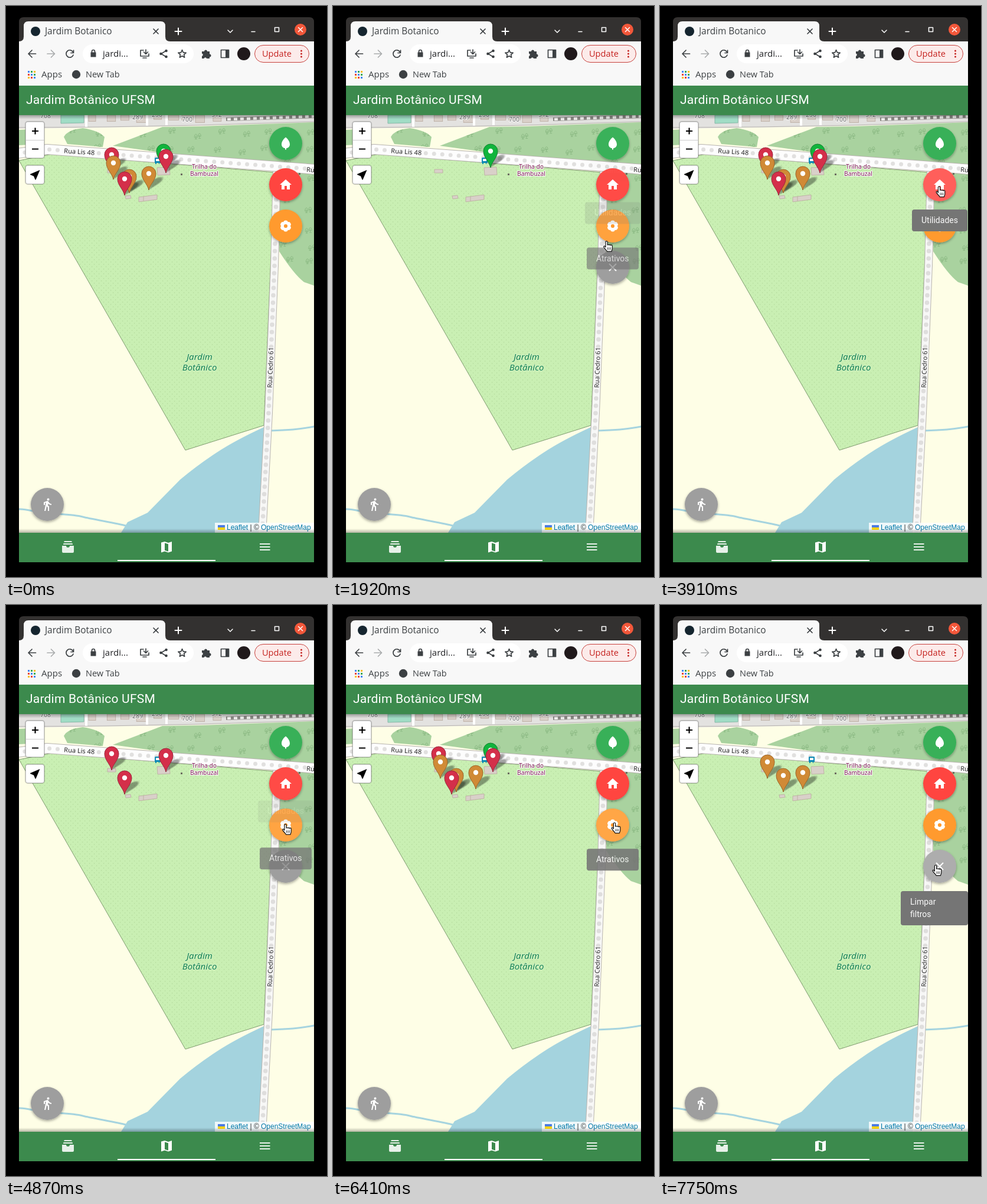
Recreate the animation shown at these times as an HTML page. Size 544 by 968 pixels, loop 7.99 s.

```html
<!DOCTYPE html>
<html lang="pt">
<head>
<meta charset="utf-8">
<title>Jardim Botânico UFSM</title>
<style>
html,body{margin:0;width:100%;height:100%;overflow:hidden;background:#000}
svg{display:block;width:100vw;height:100vh}
.ui{font:15px "Open Sans",sans-serif;fill:#3c4043}
.app{font-family:Roboto,sans-serif}
.map{font-family:"Noto Sans",sans-serif;paint-order:stroke;stroke:#fff;stroke-width:2px;stroke-linejoin:round}
.mid{text-anchor:middle}
.tip{font:14px Roboto,sans-serif;fill:#fafafa}
.attr{font:12px "Liberation Sans",Arial,sans-serif}
.line{fill:none;stroke-linecap:round;stroke-linejoin:round}
</style>
</head>
<body>
<svg viewBox="0 0 544 968">
<defs>
  <clipPath id="win"><path d="M22 943V27q0-8 8-8H514q8 0 8 8V943Z"/></clipPath>
  <clipPath id="mapBox"><path d="M22 185H522V893H22Z"/></clipPath>
  <clipPath id="disc"><circle r="28"/></clipPath>
  <path id="forest" d="M22 210 60 208 64 234 22 236ZM98 222Q104 210 130 207 157 211 167 222L164 239 104 234ZM181 237 265 205 330 204 522 197V474L505 468Q488 455 463 416V276Z"/>
  <clipPath id="woods"><use href="#forest"/></clipPath>
  <pattern id="grass" width="8" height="8" patternUnits="userSpaceOnUse">
    <rect width="8" height="8" fill="#c9efb3"/>
    <path d="M1 2h1.2M5 6h1.2" stroke="#a9cf92"/>
  </pattern>
  <filter id="soft" x="-50%" y="-50%" width="200%" height="200%"><feGaussianBlur stdDeviation="2"/></filter>
  <filter id="lift" x="-30%" y="-30%" width="160%" height="170%">
    <feDropShadow dx="0" dy="2" stdDeviation="2" flood-opacity=".34"/>
  </filter>
  <linearGradient id="fall" x2="0" y2="1"><stop stop-opacity=".3"/><stop offset="1" stop-opacity="0"/></linearGradient>
  <linearGradient id="rise" x2="0" y2="1"><stop stop-opacity="0"/><stop offset="1" stop-opacity=".28"/></linearGradient>
  <path id="pin" d="M0 0C-2.5-11-12-17-12-28a12 12 0 0 1 24 0C12-17 2.5-11 0 0Z"/>
  <path id="tree" class="line" stroke="#8ab882" d="M-3 4V-1M-5.500 1c0-7 5-7 5 0zM3 2V-2M1-1c0-6 4.500-6 4.500 0zM-4.500 4h3M2 3h3"/>
  <path id="south" d="M18 250 70 243 526 277"/>
  <path id="west" d="M459 278 455 440 445 690 434 896"/>
</defs>

<g clip-path="url(#win)">
<g clip-path="url(#mapBox)">
  <path d="M22 185H522V893H22Z" fill="#fefee6"/>
  <path d="M22 185H522V197L330 203 170 206 22 208Z" fill="#e3e2e0"/>
  <g id="town" fill="#d9d0c9" stroke="#b9aa9e" stroke-width=".8"></g>
  <path d="M22 206 170 205 330 202 522 196" fill="none" stroke="#b8b4b0"/>
  <path d="M93 185h39v13l-39 1z" fill="#a0dcc5" stroke="#86b8a6"/>
  <path d="M136 185v20M239 185v18M272 185v17" stroke="#fff" stroke-width="4"/>
  <path d="M373 192 522 187" stroke="#8b8985" stroke-width="6"/>
  <path d="M375 192 522 187" stroke="#f1f0ee" stroke-width="4.500" stroke-dasharray="6 5"/>
  <use href="#forest" fill="#a9d29f"/>
  <g id="trees" clip-path="url(#woods)"></g>
  <path d="M22 262 78 251 455 282 437 711 304 753Z" fill="url(#grass)" stroke="#7f9c70"/>
  <path d="M256 274l21-1 1 13-21 1zM172 277h14v6h-14zM202 322l9-1 1 5-9 1zM225 324l31-4v8l-31 4zM233 323v8" fill="#d9d0c9" stroke="#b9aa9e" stroke-width=".8"/>
  <path d="M195 893 206 875 240 859 295 803Q325 778 357 757T437 714L430 893Z" fill="#a4d3de"/>
  <path class="line" d="M22 853C37 852 44 858 70 860S115 862 130 866 190 877 203 881M447 720C480 719 494 718 522 713" stroke="#a6d4df" stroke-width="3"/>
  <g class="line">
    <use href="#west" stroke="#b7b3ae" stroke-width="14"/>
    <use href="#west" stroke="#f7f7f6" stroke-width="12"/>
    <use href="#west" stroke="#dfdedd" stroke-width="7.500" stroke-dasharray="0 12.500"/>
    <use href="#south" stroke="#b7b3ae" stroke-width="18"/>
    <use href="#south" stroke="#fdfdfd" stroke-width="16"/>
    <use href="#south" stroke="#e1e0df" stroke-width="7" stroke-dasharray="0 14"/>
  </g>
  <path d="M296 284h3v3h-3zM496 283h3v3h-3z" fill="#6c6c60"/>
  <path d="M254 257h7q1 0 1 1v8h-2v2h-1v-2h-4v2h-2v-2h-1v-8q0-1 2-1zM254 259v4h6v-4z" fill="#0988b5" fill-rule="evenodd"/>
  <g class="map mid" font-size="10.500" fill="#666">
    <text x="67" y="190">708</text><text x="223" y="192">289</text><text x="256" y="188">250</text>
    <text x="307" y="196">700</text><text x="357" y="188">512</text>
  </g>
  <g class="map" fill="#222" font-size="11">
    <text class="mid" transform="translate(124 251) rotate(4)">Rua Lis 48</text>
    <text class="mid" transform="translate(452 613) rotate(-88)">Rua Cedro 61</text>
    <text transform="translate(509 281) rotate(4)">Ru</text>
  </g>
  <g class="map mid" fill="#7b1750" font-size="10.300">
    <text x="336" y="276">Trilha do</text><text x="336" y="288">Bambuzal</text>
  </g>
  <g class="map mid" style="stroke:#d5f3c4" fill="#118052" font-size="15" font-style="italic">
    <text x="328" y="600">Jardim</text><text x="328" y="618">Botânico</text>
  </g>
  <g id="pins"></g>
  <g fill="#fff" stroke="#000" stroke-opacity=".22" stroke-width="2">
    <rect x="33" y="196" width="32" height="62" rx="4"/><rect x="33" y="270" width="32" height="32" rx="4"/>
  </g>
  <path d="M34 227.500H64" stroke="#ccc"/>
  <path d="M44 212H55M49.500 206.500V217.500M44 242.500H55" stroke="#000" stroke-width="2.200"/>
  <path d="M57.500 278 41 285v1l6 2.500 2.500 6h1z"/>
  <path d="M354 876H522V893H354Z" fill="#fff" fill-opacity=".82"/>
  <path d="M359 880h12v4h-12z" fill="#4c7be1"/><path d="M359 884h12v4h-12z" fill="#ffd500"/>
  <g class="attr" fill="#0078a8"><text x="374" y="888">Leaflet</text><text x="413.500" y="888" fill="#333">| ©</text><text x="432" y="888">OpenStreetMap</text></g>
  <path d="M22 185H522V192H22Z" fill="url(#fall)"/>
  <path d="M22 886H522V893H22Z" fill="url(#rise)"/>
</g>

<!-- browser frame -->
<path d="M22 19H522V61H22Z" fill="#333130"/>
<path d="M22 60q8 0 8-8V34q0-8 8-8H262q8 0 8 8V52q0 8 8 8H522V135H22Z" fill="#f8f8f8"/>
<circle cx="50" cy="43" r="8" fill="#15252f"/>
<rect x="130" y="65" width="188" height="32" rx="16" fill="#fff"/>
<rect x="421.500" y="66.500" width="92" height="29" rx="14.500" fill="#fcebea" stroke="#c5403c"/>
<g class="ui">
  <text x="66" y="48" style="font-size:15.400px">Jardim Botanico</text>
  <text x="60" y="121">Apps</text>
  <text x="135" y="121" style="font-size:14.500px">New Tab</text>
  <text x="164" y="86" style="fill:#202124">jardi...</text>
  <text x="434" y="86" style="fill:#c5221f;font-size:14.600px">Update</text>
</g>
<circle cx="499" cy="40" r="10" fill="#f2573a"/>
<g class="line" stroke="#fff" stroke-width="1.500">
  <path d="M286.500 43h11M292 37.500v11" stroke-width="2"/>
  <path d="M376 41l4 4 4-4M416 43.500h6M455.500 36.500h7v7h-7zM495.500 36.500l7 7M502.500 36.500l-7 7"/>
</g>
<g class="line" stroke="#3c4043" stroke-width="1.700">
  <path d="M250 39l8 8M258 39l-8 8M50.500 81H38M44 75l-6 6 6 6M114 79A6.200 6.200 0 1 0 114 83M114.500 75v4.500H110"/>
  <path d="M70 81H82.500M76.500 75l6 6-6 6" opacity=".42"/>
  <path d="M233 75h-5v10h14v-4M232 88h6M237 74v7M233.500 78l3.500 3.500 3.500-3.500"/>
  <path d="M271 76l-8 5 8 5M145.500 79v-2a2.500 2.500 0 0 1 5 0v2M364.500 74.500h13v13h-13z"/>
  <path id="star"/>
</g>
<g fill="#3c4043">
  <circle cx="262.500" cy="81" r="2.300"/><circle cx="271.500" cy="76" r="2.300"/><circle cx="271.500" cy="86" r="2.300"/>
  <path d="M143.500 78.500h9v8h-9zM372 75h5v12h-5z"/>
  <path d="M332 77h4a2.500 2.500 0 0 1 5 0h4v4.500a2.500 2.500 0 0 1 0 5V89H340a2.300 2.300 0 0 0-4.500 0H332V85a2.300 2.300 0 0 0 0-4.500Z"/>
  <circle cx="119" cy="116" r="7.200"/>
</g>
<circle cx="403" cy="81" r="11" fill="#20191b"/>
<path class="line" d="M500.500 76v0M500.500 81v0M500.500 86v0" stroke="#c5221f" stroke-width="3"/>
<g id="dots"></g>

<!-- app bars -->
<path d="M22 135H522V185H22ZM22 893H522V943H22Z" fill="#3c8a4d"/>
<text class="app" x="34" y="166" font-size="21" letter-spacing=".21" fill="#fff">Jardim Botânico UFSM</text>
<g fill="#fff">
  <path d="M189 939h166v2H189z"/>
  <g opacity=".88">
    <path d="M99 907h12l1 2H98zM97.500 911h15l.7 2h-16.400zM95 915h7q0 3 3 3t3-3h7v10q0 2-2 2H97q-2 0-2-2z"/>
    <path d="M430 911h17.500v2H430zM430 916h17.500v2H430zM430 921h17.500v2H430z"/>
  </g>
  <path d="M263 909.500 269 908l6 2 6-2v16.500l-6 2-6-2-6 2zM269 910.300v12.500l6 2v-12.500z" fill-rule="evenodd"/>
</g>
<g id="fabs"></g>
<g id="tips"></g>
<g id="cursor" fill="#fff" stroke="#111" stroke-width="1.200" stroke-linejoin="round" stroke-linecap="round">
  <g id="point">
    <path d="M-1.600 1.600a1.600 1.600 0 0 1 3.200 0V6.600a1.500 1.500 0 0 1 2.800.2a1.500 1.500 0 0 1 2.800.5a1.400 1.400 0 0 1 2.600 1V12.500C9.800 15 8.700 15.500 8.500 17.600H1C.6 15.500-3.600 13-4.800 9.800C-5.200 8.400-3.400 7.800-2.600 9L-1.600 10.400Z"/>
    <path d="M2 11v3.500M4.400 11v3.500M6.800 11v3.500" stroke-width=".8"/>
  </g>
  <g id="grab" transform="translate(0 2)">
    <path d="M-4.800 1V-5.200a1.400 1.400 0 0 1 2.800 0V-7a1.400 1.400 0 0 1 2.900 0V-6.200a1.400 1.400 0 0 1 2.800 0V-4a1.400 1.400 0 0 1 2.800 0V3C6.500 5.500 5 6.500 5 8.800H-3C-3.200 6.500-6.500 4-7.800 1.500C-8.300.2-6.600-.8-5.800.2Z"/>
    <path d="M-2-5V-.5M.9-6V-.5M3.700-5V-.5" stroke-width=".9"/>
  </g>
</g>
</g>
</svg>
<script>
const $ = id => document.getElementById(id);
const add = (parent, tag, attrs = {}, text) => {
  const el = document.createElementNS('http://www.w3.org/2000/svg', tag);
  for (const k in attrs) el.setAttribute(k, attrs[k]);
  if (text) el.textContent = text;
  parent.appendChild(el);
  return el;
};
let seed = 5;
const rnd = (lo, hi) => {
  seed = seed * 16807 % 2147483647;
  return lo + (hi - lo) * seed / 2147483647;
};
const range = n => [...Array(n).keys()];

// Scenery made by rule
for (let x = 140; x < 360; x += rnd(22, 34))
  add($('town'), 'rect', {x, y: 185, width: rnd(12, 20), height: rnd(6, 13)});
for (let y = 216; y < 450; y += 27)
  for (let x = 118; x < 520; x += 40)
    add($('trees'), 'use', {href: '#tree', x: x + rnd(-12, 12), y: y + rnd(-6, 6)});
const APP_DOTS = ['#ea4335', '#fbbc04', '#34a853', '#4285f4'];
range(9).forEach(i => add($('dots'), 'rect',
  {x: 37 + i % 3 * 5, y: 110 + (i / 3 | 0) * 5, width: 3, height: 3, fill: APP_DOTS[(i + 1) * 3 % 4]}));
$('star').setAttribute('d', 'M' + range(10).map(i => {
  const a = i * Math.PI / 5, r = i % 2 ? 3.2 : 7;
  return [298.5 + r * Math.sin(a), 81.5 - r * Math.cos(a)];
}).join('L') + 'Z');

// Pins back to front: kind, tip x, tip y
const PIN_FILL = ['#11b43c', '#d42f4a', '#d08a36'], PIN_EDGE = ['#157f31', '#98283c', '#9a6428'];
const pins = [[0, 267, 274], [1, 179, 280], [1, 271, 283], [2, 182, 294], [2, 242, 312], [2, 209, 317], [1, 201, 321]]
  .map(([kind, x, y]) => ({kind, at: `translate(${x} ${y})`}));
pins.forEach(p => p.shade = add($('pins'), 'use',
  {href: '#pin', opacity: .36, filter: 'url(#soft)', transform: p.at + 'matrix(.65 0 -.5 .55 0 0)'}));
pins.forEach(p => {
  p.el = add($('pins'), 'g', {transform: p.at});
  add(p.el, 'use', {href: '#pin', fill: PIN_FILL[p.kind], stroke: PIN_EDGE[p.kind]});
  add(p.el, 'circle', {cy: -28, r: 4.2, fill: '#fff'});
});

const ICON = {
  walk: 'M1.500-6.500a2 2 0 1 0 0-4 2 2 0 0 0 0 4zM-2.200-3.100L-5 11h2.100l1.800-8L1 5v6h2V3.500L.9 1.500l.6-3C2.800 0 4.800 1 7 1V-1C5.100-1 3.500-2 2.700-3.400l-1-1.600C1.300-5.600.7-6 0-6L-6-3.700V1h2V-2.400z',
  leaf: 'M0-10.500C5-6.500 7-2 7 1.500C7 5.500 4 8 1 8V10.500H-1V8C-4 8-7 5.500-7 1.500C-7-2-5-6.500 0-10.500Z',
  home: 'M-2 8V2h4v6h5V0h3L0-9-10 0h3v8z',
  close: 'M-6 6 6-6M-6-6 6 6'
};
function flower(g, hole) {
  range(6).forEach(i => add(g, 'circle',
    {cy: -5.6, r: 3.9, fill: '#fff', transform: `rotate(${i * 60})`}));
  add(g, 'circle', {r: 3.1, fill: hole});
}
function fab(x, y, fill, d) {
  const g = add($('fabs'), 'g', {transform: `translate(${x} ${y})`});
  add(g, 'circle', {r: 28, fill, filter: 'url(#lift)'});
  const glow = add(g, 'circle', {r: 28, fill: '#fff', opacity: 0});
  const ripple = add(add(g, 'g', {'clip-path': 'url(#disc)'}), 'circle', {fill: '#fff', opacity: 0});
  if (!d) flower(g, fill);
  else add(g, 'path', d === ICON.close ? {d, stroke: '#fff', 'stroke-width': 2} : {d, fill: '#fff'});
  return {g, glow, ripple, y, spans: []};
}
fab(70, 845, '#9e9e9e', ICON.walk);
const CLEAR = 3, FAB_X = 474, GAP = 70;
const fabs = [['#38b058', ICON.leaf], ['#ff453f', ICON.home], ['#ff9a2e'], ['#9e9e9e', ICON.close]]
  .map(([fill, d], i) => fab(FAB_X, 233 + GAP * i, fill, d));

['Trilhas', 'Utilidades', 'Atrativos', 'Limpar filtros'].forEach((label, i) => {
  const g = fabs[i].tip = add($('tips'), 'g'), y = 275 + GAP * i;
  const lines = label.split(' '), w = [76, 94, 88, 114][i], x = Math.min(FAB_X - w / 2, 522 - w);
  add(g, 'rect', {x, y, width: w, height: 16 + 21 * lines.length, rx: 4, fill: '#757575'});
  lines.forEach((s, n) => add(g, 'text', {class: 'tip', x: x + 16, y: y + 23 + 21 * n}, s));
});

const LOOP = 7990, ENTER = 190, CLEAR_DELAY = 80;
// Pointer moves: start, end, target x, target y
const MOVES = [[190, 850, 474, 220], [1625, 1993, 461, 442], [3280, 3740, 473, 306],
  [4600, 5150, 474, 439], [6090, 6400, 477, 369], [7150, 7500, 467, 441]];
const CLICK_TIMES = [1030, 2880, 4130, 5500, 6550];

const clamp = v => Math.max(0, Math.min(1, v));
const easeOut = v => 1 - (1 - clamp(v)) ** 3;
const show = (el, on) => el.setAttribute('visibility', on ? 'visible' : 'hidden');

function pointerAt(t) {
  let x = 340, y = 419;
  for (const [from, to, tx, ty] of MOVES) {
    const k = clamp((t - from) / (to - from));
    x += (tx - x) * k;
    y += (ty - y) * k;
  }
  return [x, y];
}
function fabUnder([x, y], filtered) {
  return fabs.findIndex((b, i) => (i < CLEAR || filtered) && Math.hypot(x - FAB_X, y - b.y) < 28.5);
}

// Rehearse the loop once: hover spans, clicks and filters follow from the pointer
const clicks = [], filters = [];
const filterAt = t => filters.find(f => t >= f.from && t < f.to);
for (let t = ENTER, last = -1; t < LOOP; t += 5) {
  const hit = fabUnder(pointerAt(t), filterAt(t));
  if (hit !== last) {
    if (last >= 0) fabs[last].spans[fabs[last].spans.length - 1].to = t;
    if (hit >= 0) fabs[hit].spans.push({from: t, to: LOOP});
    last = hit;
  }
  if (CLICK_TIMES.includes(t) && hit >= 0) {
    clicks.push({t, fab: hit});
    if (hit === CLEAR) filterAt(t).to = t + CLEAR_DELAY;
    else filters.push({kind: hit, from: t, to: LOOP});
  }
}

const level = (b, t, ms) => Math.max(0, ...b.spans.map(({from, to}) =>
  t < from ? 0 : easeOut((Math.min(t, to) - from) / ms) * (1 - easeOut((t - to) / ms))));

function draw(t) {
  const filter = filterAt(t);
  pins.forEach(p => [p.el, p.shade].forEach(el => show(el, !filter || filter.kind === p.kind)));

  fabs.forEach((b, i) => {
    const shown = i < CLEAR || !!filter, p = level(b, t, 300);
    show(b.g, shown);
    b.glow.setAttribute('opacity', .15 * level(b, t, 400));
    show(b.tip, shown && p > .002);
    b.tip.setAttribute('opacity', p);
    b.tip.setAttribute('transform', `translate(0 ${-15 * (1 - p)})`);

    const click = clicks.find(c => c.fab === i && t >= c.t && t < c.t + 475);
    const age = click ? t - click.t : 475;
    b.ripple.setAttribute('r', 8 + 48 * easeOut(age / 225));
    b.ripple.setAttribute('opacity', .2 * (1 - clamp((age - 225) / 250)));
  });

  const at = pointerAt(t), over = fabUnder(at, filter) >= 0;
  $('cursor').setAttribute('transform', `translate(${at})`);
  show($('point'), t >= ENTER && over);
  show($('grab'), t >= ENTER && !over);
}

const start = performance.now();
function tick(now) {
  draw(Math.max(0, now - start) % LOOP);
  requestAnimationFrame(tick);
}
draw(0);
requestAnimationFrame(tick);
</script>
</body>
</html>
```
